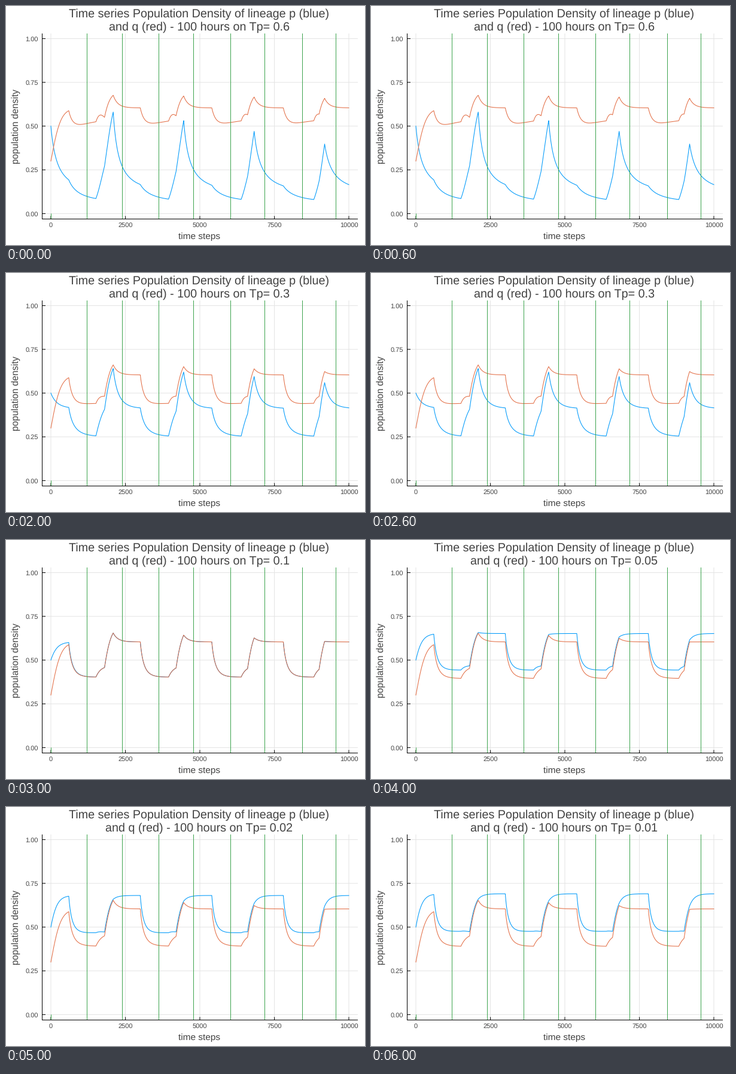
Recreate the animation shown at these times as a matplotlib script. Size 600 px wide and 400 px high, loop 7 s.

```python
import numpy as np
import matplotlib.pyplot as plt
from matplotlib.animation import FuncAnimation

plt.rcParams["font.family"] = "Liberation Sans"
plt.rcParams["text.hinting"] = "no_hinting"

DPI = 100
PX = 72 / DPI  # points per pixel
BLUE, RED, GREEN = "#009afa", "#e36f47", "#3da44e"
INK = "#424242"
LEFT, RIGHT, TOP, BOTTOM = 60.5, 588, 46, 356.5
TP = [0.6, 0.5, 0.3, 0.1, 0.05, 0.02, 0.01]
TQ = 0.1
STEPS = 10000


def to_x(t):
    return 75 + 0.0498 * t


def to_y(v):
    return 347.4 - 292.8 * v


def simulate(tp):
    """Two logistic lineages; crowding in harsh seasons, relief in some windows."""
    p = np.full((STEPS + 1, len(tp)), 0.5)
    q = np.full_like(p, 0.3)
    for t in range(STEPS):
        k = t // 2400
        harsh = (t + 600) // 1200 % 2 == 1
        relief = 1512 + 2437 * k <= t < 2092 + 2365 * k
        cost = 0 if relief else 0.96
        a, b = p[t], q[t]
        shared = a * b / (a + b) if harsh else 0
        p[t + 1] = a + 0.01 * a * (0.7 - cost * tp - a - shared)
        q[t + 1] = b + 0.01 * b * (0.7 - cost * TQ - b - shared)
    return p, q


fig = plt.figure(figsize=(6, 4), dpi=DPI, facecolor="white")
ax = fig.add_axes([0, 0, 1, 1])
ax.set_xlim(0, 600)
ax.set_ylim(400, 0)
ax.axis("off")


def segment(x, y, color, z):
    ax.plot(x, y, color=color, lw=PX, zorder=z, snap=False,
            solid_capstyle="butt")


def marker(t, top):
    x = np.floor(to_x(t)) + 0.5
    segment([x, x], [top, BOTTOM], GREEN, 4)


def label(x, y, text, size, **kw):
    kw = {"ha": "center", "va": "baseline", "color": INK, **kw}
    return ax.text(x, y, text, fontsize=size * PX, **kw)


# Grid, ticks and axes
for t in range(0, STEPS + 1, 2500):
    x = to_x(t)
    segment([x, x], [TOP, BOTTOM], "#e4e4e4", 1)
    segment([x, x], [BOTTOM - 5, BOTTOM], "black", 3)
    label(x, 370, str(t), 11)
for v in np.linspace(0, 1, 5):
    y = to_y(v)
    segment([LEFT, RIGHT], [y, y], "#e4e4e4", 1)
    segment([LEFT, LEFT + 5.5], [y, y], "black", 5)
    label(54, y + 4, f"{v:.2f}", 11, ha="right")
segment([LEFT, LEFT], [TOP, BOTTOM + 0.5], "black", 5)
segment([LEFT - 0.5, RIGHT], [BOTTOM, BOTTOM], "black", 5)

# Vertical markers
marker(0, to_y(0))
for k in range(4):
    marker(1214 + 2409.5 * k, TOP)
    marker(2400 + 2389.3 * k, TOP)

label(323, 19, "Time series Population Density of lineage p (blue)", 19.75)
subtitle = label(323, 41, "", 19.75)
label(323, 390, "time steps", 15.4)
label(21, 201, "population density", 15.5, rotation=90,
      rotation_mode="anchor")

p, q = simulate(np.array(TP))
xs = to_x(np.arange(STEPS + 1))
p_line, = ax.plot([], [], color=BLUE, lw=1.05 * PX, zorder=2)
q_line, = ax.plot([], [], color=RED, lw=1.05 * PX, zorder=3)


def draw(i):
    p_line.set_data(xs, to_y(p[:, i]))
    q_line.set_data(xs, to_y(q[:, i]))
    subtitle.set_text(f"and q (red) - 100 hours on Tp= {TP[i]:g}")
    return p_line, q_line, subtitle


anim = FuncAnimation(fig, draw, frames=len(TP), interval=1000, repeat=True)
plt.show()
```
